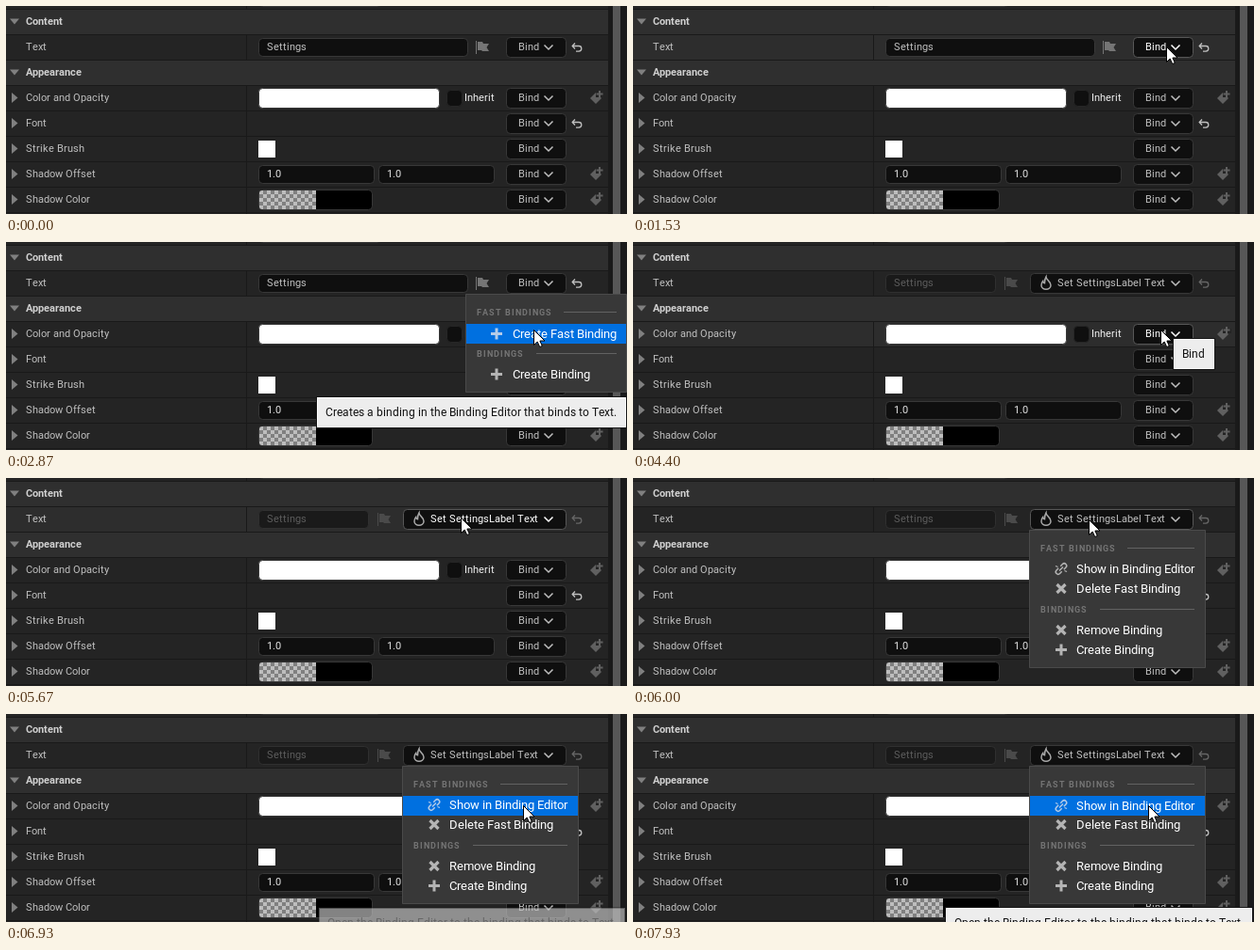
Animation, 657 px wide and 221 px high, one loop 8000 ms. Source, as an HTML page with a canvas:

```html
<!DOCTYPE html>
<html lang="en">
<head>
<meta charset="utf-8">
<title>Binding menu</title>
<style>
  html, body { margin: 0; width: 100%; height: 100%; overflow: hidden; background: #1a1a1a; }
  canvas { display: block; width: 657px; height: 221px; }
</style>
</head>
<body>
<canvas id="stage" width="657" height="221"></canvas>
<script>
const ctx = document.getElementById('stage').getContext('2d');
const LOOP = 8000;
const GREY = '#c0c0c0', EDGE = '#383838', FIELD = '#0f0f0f', LINE = '#191919';
const SMALL = 11, TIP = 12, MENU = 13;

// Pointer moves: start, end, from, to, easing
const easeOut = p => 1 - (1 - p) ** 2.4;
const easeIn = p => p ** 1.4;
const smooth = p => p * p * (3 - 2 * p);
const MOVES = [
  [930, 1530, [470, 136], [564, 43], easeOut],
  [2070, 2530, [564, 43], [558, 93], smooth],
  [4470, 4800, [558, 93], [20, 226], easeIn],
  [5200, 5600, [202, 172], [481, 42], easeOut],
  [5930, 6330, [481, 42], [491, 65], smooth],
  [6330, 6600, [491, 65], [629, 83], smooth],
  [6600, 6730, [629, 83], [595, 87], smooth],
  [6730, 7000, [595, 87], [545, 97], easeOut]
];

const MENUS = [
  { from: 1670, to: 3670, x: 486, w: 171, h: 105, heads: [[74.5, 'FAST BINDINGS', 92], [118.5, 'BINDINGS', 63]],
    right: 646, icon: 33, label: 50, press: 2870,
    items: [[96.5, 'plus', 'Create Fast Binding'], [140.5, 'plus', 'Create Binding']] },
  { from: 5730, to: LOOP, x: 419, w: 187, h: 147, heads: [[74.5, 'FAST BINDINGS', 92], [139.5, 'BINDINGS', 63]],
    right: 594, icon: 34, label: 50, press: 7930,
    items: [[96.5, 'link', 'Show in Binding Editor'], [117.5, 'cross', 'Delete Fast Binding'],
            [161.5, 'cross', 'Remove Binding'], [182.5, 'plus', 'Create Binding']] }
];

const TIPS = [
  [2570, 3670, 328, 164, 329, 'Creates a binding in the Binding Editor that binds to Text.'],
  [4400, 4470, 571, 102, 45, 'Bind'],
  [6900, LOOP, 330, 205, 326, 'Open the Binding Editor to the binding that binds to Text.']
];

const clamp = v => Math.max(0, Math.min(1, v));

function pointer(t) {
  if (t < 930 || (t >= 4800 && t < 5200)) return null;
  const [a, b, p, q, ease] = MOVES.filter(m => m[0] <= t).pop();
  const k = ease(clamp((t - a) / (b - a)));
  return { x: Math.round(p[0] + (q[0] - p[0]) * k), y: Math.round(p[1] + (q[1] - p[1]) * k) };
}

const inside = (c, x, y, w, h) => !!c && c.x >= x && c.x < x + w && c.y >= y && c.y < y + h;

function rect(x, y, w, h, fill) {
  ctx.fillStyle = fill;
  ctx.fillRect(x, y, w, h);
}

// Glyphs advance by whole pixels, as hinted interface text does
function text(str, x, y, color = GREY, size = SMALL, weight = 400, spacing = 0) {
  ctx.font = `${weight} ${size}px Roboto, sans-serif`;
  ctx.fillStyle = color;
  const base = y + Math.round(size * 0.356);
  for (const ch of str) {
    ctx.fillText(ch, x, base);
    x += Math.round(ctx.measureText(ch).width) + spacing;
  }
}

function box(x, y, w, h, fill = FIELD, edge = EDGE, r = 4) {
  ctx.beginPath();
  ctx.roundRect(x + 0.5, y + 0.5, w - 1, h - 1, r);
  ctx.fillStyle = fill;
  ctx.fill();
  ctx.strokeStyle = edge;
  ctx.lineWidth = 1;
  ctx.stroke();
}

function trace(points, close) {
  ctx.beginPath();
  points.forEach(([x, y]) => ctx.lineTo(x, y));
  if (close) ctx.closePath();
}

function poly(points, fill) {
  trace(points, true);
  ctx.fillStyle = fill;
  ctx.fill();
}

function stroke(points, color, width) {
  trace(points);
  ctx.strokeStyle = color;
  ctx.lineWidth = width;
  ctx.stroke();
}

function at(x, y, draw, angle = 0) {
  ctx.save();
  ctx.translate(x, y);
  ctx.rotate(angle);
  draw();
  ctx.restore();
}

function expander(y, open) {
  if (open) poly([[4, y - 2.5], [14, y - 2.5], [9, y + 3.5]], '#808080');
  else poly([[6, y - 5], [12.5, y + 0.5], [6, y + 6]], '#808080');
}

function chevron(x, y, color) {
  stroke([[x - 4.5, y - 2], [x, y + 2.5], [x + 4.5, y - 2]], color, 1.5);
}

function flag(x, y, color) {
  rect(x, y - 6, 1, 14, color);
  poly([[x + 2, y - 5], [x + 7, y - 5], [x + 8, y - 3], [x + 14, y - 3], [x + 11.5, y + 1], [x + 14, y + 5],
        [x + 7, y + 5], [x + 6, y + 4], [x + 2, y + 4]], color);
}

function revert(y, color = GREY) {
  at(598, y + 1, () => {
    stroke([[4, -4.5], [1.2, -1.5], [4, 1.5]], color, 1.3);
    ctx.beginPath();
    ctx.moveTo(1.2, -1.5);
    ctx.lineTo(8, -1.5);
    ctx.arc(8, 1.3, 2.8, -Math.PI / 2, Math.PI / 2);
    ctx.lineTo(5, 4.1);
    ctx.stroke();
  });
}

function keyIcon(y) {
  poly([[618, y + 1], [624, y - 5], [630, y + 1], [624, y + 7]], '#606060');
  rect(624, y - 5, 9, 5, '#242424');
  rect(627, y - 7, 2, 7, '#606060');
  rect(624.5, y - 4.5, 7, 2, '#606060');
}

function flame(x, y, color) {
  at(x, y, () => {
    ctx.beginPath();
    ctx.moveTo(0, -6.5);
    ctx.bezierCurveTo(0, -3, 5, -2, 5, 2.5);
    ctx.bezierCurveTo(5, 8, -5, 8, -5, 2.5);
    ctx.bezierCurveTo(-5, 0.5, -4.2, -1, -3.3, -2);
    ctx.quadraticCurveTo(-3, 0.3, -1.5, 0.3);
    ctx.quadraticCurveTo(-1.5, -4, 0, -6.5);
    ctx.closePath();
    ctx.strokeStyle = color;
    ctx.lineWidth = 1.5;
    ctx.stroke();
  });
}

function bindButton(x, y, label, c, menuOpen) {
  const over = inside(c, x, y - 10, 593 - x, 22);
  const color = over && !menuOpen ? '#fff' : GREY;
  box(x, y - 10, 593 - x, 22, FIELD, over ? '#575757' : EDGE);
  if (label === 'Bind') text(label, x + 13, y, color);
  else {
    flame(437, y + 0.5, '#a8a8a8');
    text(label, 449, y, color);
  }
  chevron(574, y + 0.5, color);
}

function shadowColor() {
  box(267, 195, 121, 22, '#000');
  ctx.save();
  ctx.beginPath();
  ctx.roundRect(268, 196, 60, 20, [3, 0, 0, 3]);
  ctx.clip();
  for (let i = 0; i < 15; i++)
    for (let j = 0; j < 5; j++)
      rect(268 + i * 4, 196 + j * 4, 4, 4, (i + j) % 2 ? '#808080' : '#bdbdbd');
  ctx.restore();
}

function header(y, label) {
  rect(0, y - 12, 637, 26, '#2f2f2f');
  expander(y, true);
  text(label, 21, y, '#d0d0d0', SMALL, 700);
}

function panel(c, bound, menuOpen) {
  rect(0, 0, 657, 221, '#1a1a1a');
  rect(0, 0, 637, 221, '#242424');
  rect(642, 0, 8, 221, '#575757');
  box(267, -21, 131, 22);

  const labels = { 43: 'Text', 97: 'Color and Opacity', 124: 'Font', 151: 'Strike Brush', 178: 'Shadow Offset', 205: 'Shadow Color' };
  for (const key in labels) {
    const y = +key;
    if (!menuOpen && inside(c, 0, y - 13, 637, 27)) rect(0, y - 12, 637, 26, '#2d2d2d');
    if (y > 43) expander(y, false);
    text(labels[key], 21, y);
  }
  rect(254, 0, 1, 221, LINE);
  header(16, 'Content');
  header(70, 'Appearance');
  for (let y = 3; y < 221; y += 27) rect(0, y, 637, 1, LINE);

  if (bound) {
    box(267, 34, 117, 20, '#1a1a1a', '#303030');
    text('Settings', 276, 43, '#5c5c5c');
    flag(393, 43, '#4a4a4a');
    bindButton(420, 43, 'Set SettingsLabel Text', c, menuOpen);
  } else {
    box(267, 34, 222, 20);
    text('Settings', 276, 43);
    flag(497, 43, '#757575');
    bindButton(529, 43, 'Bind', c, menuOpen);
  }
  revert(43, bound ? '#666' : GREY);

  for (let y = 97; y < 221; y += 27) bindButton(529, y, 'Bind', c, menuOpen);
  [97, 178, 205].forEach(keyIcon);
  revert(124);

  box(267, 87, 192, 22, '#fff');
  box(466, 89, 17, 18, FIELD, '#262626');
  text('Inherit', 485, 97, '#f0f0f0');
  rect(267, 143, 18, 18, '#fff');
  [267, 394].forEach(x => {
    box(x, 169, 123, 20);
    text('1.0', x + 9, 178, '#e4e4e4');
  });
  shadowColor();
}

const ICONS = {
  plus(color) {
    rect(-6, -1.5, 12, 3, color);
    rect(-1.5, -6, 3, 12, color);
  },
  cross(color) {
    stroke([[-4.5, -4.5], [4.5, 4.5]], color, 3.2);
    stroke([[4.5, -4.5], [-4.5, 4.5]], color, 3.2);
  },
  link(color) {
    ctx.strokeStyle = color;
    ctx.lineWidth = 1.5;
    for (const turn of [0, Math.PI]) at(0, 0, () => {
      ctx.beginPath();
      ctx.moveTo(1.5, -2.5);
      ctx.lineTo(4.5, -2.5);
      ctx.arc(4.5, 0, 2.5, -Math.PI / 2, Math.PI / 2);
      ctx.lineTo(1.5, 2.5);
      ctx.stroke();
    }, turn - Math.PI / 4);
    stroke([[-2, 2], [2, -2]], color, 1.5);
    stroke([[-6, -3], [-3.5, -2]], color, 1.2);
    stroke([[3.5, 2], [6, 3]], color, 1.2);
  }
};

function drawMenu(m, t, c) {
  ctx.globalAlpha = m.from < 2000 ? clamp(0.5 + (t - m.from) / 260) : 1;
  box(m.x, 55, m.w, m.h, '#383838', '#4a4a4a', 0);
  for (const [y, label, gap] of m.heads) {
    text(label, m.x + 12, Math.ceil(y), '#747474', 9, 700, 1);
    rect(m.x + 12 + gap, Math.floor(y), m.right - m.x - 12 - gap, 1, '#626262');
  }
  for (const [y, icon, label] of m.items) {
    const over = inside(c, m.x, y - 9.5, m.w, 21);
    const drop = over && t >= m.press ? 1 : 0;
    if (over) rect(m.x + 1, Math.floor(y - 9), m.w - 2, 21, '#0070e0');
    at(m.x + m.icon, y + drop, () => ICONS[icon](over ? '#b4cbe8' : '#b4b4b4'));
    text(label, m.x + m.label, Math.floor(y) + drop, '#fff', MENU);
  }
  ctx.globalAlpha = 1;
}

function drawTip([from, to, x, y, w, label], t) {
  if (t < from || t >= to) return;
  ctx.globalAlpha = label === 'Bind' ? 1 : clamp((t - from) / 100);
  rect(x, y, w, 34, '#161616');
  rect(x + 1, y + 1, w - 2, 32, '#fff');
  rect(x + 2, y + 2, w - 4, 30, '#ededed');
  text(label, x + 10, y + 17, '#111', TIP);
  ctx.globalAlpha = 1;
}

function drawPointer(c) {
  at(c.x + 0.5, c.y + 0.5, () => {
    trace([[0, 0], [0, 16], [3.7, 12.5], [6.2, 18], [8.8, 17], [6.4, 11.5], [11.5, 11.5]], true);
    ctx.fillStyle = '#fff';
    ctx.fill();
    ctx.strokeStyle = '#000';
    ctx.lineWidth = 1;
    ctx.stroke();
  });
}

function frame(now) {
  const t = now % LOOP;
  const c = pointer(t);
  const menu = MENUS.find(m => t >= m.from && t < m.to);
  panel(t >= 3670 && t < 3800 ? null : c, t >= 3730, !!menu);
  if (menu) drawMenu(menu, t, c);
  TIPS.forEach(tip => drawTip(tip, t));
  if (c) drawPointer(c);
}

const start = performance.now();
function tick() {
  frame(performance.now() - start);
  requestAnimationFrame(tick);
}
tick();
</script>
</body>
</html>
```
